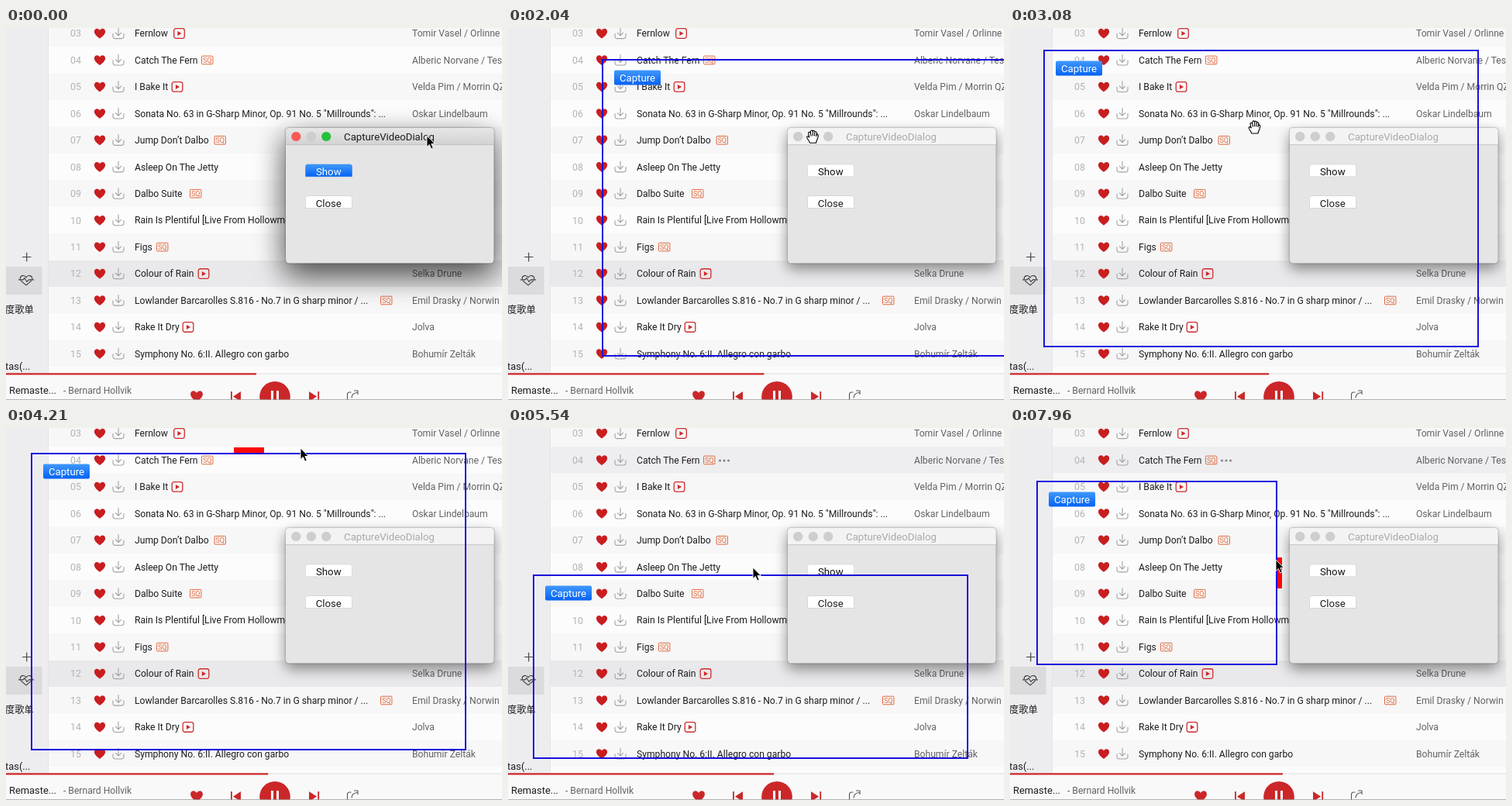
Recreate the animation shown at these times as an HTML page. Size 640 by 480 pixels, loop 8 s.

```html
<!DOCTYPE html>
<html lang="en">
<head>
<meta charset="utf-8">
<title>Capture dialog</title>
<style>
  html, body { margin: 0; width: 100%; height: 100%; overflow: hidden; background: #fcfcfd; }
  svg { display: block; width: 640px; height: 480px; }
  text { font-family: Roboto, Inter, sans-serif; font-size: 12.15px; fill: #1d1d1f; white-space: pre; }
  .num { fill: #b3b3b5; font-size: 12.4px; }
  .artist { fill: #626264; }
  .side { font-size: 12.9px; }
  .cjk { font-family: "Noto Sans CJK SC", "Noto Sans CJK", sans-serif; font-size: 12.3px; }
  .ui { font-size: 13.2px; text-anchor: middle; }
  .sq { font-size: 9px; fill: #e2683c; text-anchor: middle; }
  .line { fill: none; stroke-linecap: round; stroke-linejoin: round; }
  .light { stroke: #0001; stroke-width: .5; }
  #dialog { filter: drop-shadow(0 14px 19px #0008) drop-shadow(0 0 1px #0008); }
  #dialog.idle { filter: drop-shadow(0 7px 9px #0005) drop-shadow(0 0 1px #0006); }
  .idle .titlebar { fill: #f4f3f4; }
  .idle .title { fill: #a9a9a9; }
  .idle .light { fill: #cfcecf; }
  .idle .default { fill: #fff; stroke: #c6c6c6; }
  .idle .default + text { fill: #111; }
  .default + text { fill: #fff; }
</style>
</head>
<body>
<svg id="stage" viewBox="0 0 640 480">
  <defs>
    <linearGradient id="barGray" x2="0" y2="1"><stop stop-color="#e7e6e7"/><stop offset="1" stop-color="#d3d2d3"/></linearGradient>
    <linearGradient id="blue" x2="0" y2="1"><stop stop-color="#3f98fb"/><stop offset="1" stop-color="#0663f3"/></linearGradient>
    <path id="heart" d="M0 6.2C-3 4-7.1 1-7.1-2.6C-7.1-7.1-1.8-7.9 0-4.1C1.8-7.9 7.1-7.1 7.1-2.6C7.1 1 3 4 0 6.2Z"/>
    <g id="download" class="line" stroke="#a2a2a4" stroke-width="1.1">
      <path d="M0-7V2.5M-3.6-.8L0 2.8L3.6-.8M-7 .3V3.4Q-7 6.6-3.8 6.6H3.8Q7 6.6 7 3.4V.3"/>
    </g>
    <g id="video">
      <rect x=".7" y="-6.3" width="13.6" height="12.6" rx="2.6" fill="none" stroke="#cf2b2b" stroke-width="1.3"/>
      <path d="M5.4-3L10.6 0L5.4 3Z" fill="#cf2b2b"/>
    </g>
    <g id="sq">
      <rect x=".5" y="-5.3" width="14.4" height="10.6" rx="1" fill="none" stroke="#e2683c"/>
      <text class="sq" x="7.7" y="3.2">SQ</text>
    </g>
  </defs>

  <g id="list"></g>

  <rect width="54.5" height="446" fill="#ededf0"/>
  <path d="M54.5 0V446" stroke="#e3e3e6"/>
  <rect y="308" width="46.5" height="36" fill="#dbdbdd"/>
  <path class="line" d="M21.5 295.5H32M26.7 290.2V300.8" stroke="#444" stroke-width="1.2"/>
  <g class="line" transform="translate(26 325.5)" stroke="#38383a" stroke-width="1.1">
    <path d="M-6.5 .8L0 6.4L6.5 .8M-7.8-1.8C-7.8-6.6-2-7.2 0-3.6C2-7.2 7.8-6.6 7.8-1.8"/>
    <path d="M-9.5-.6H-4L-2-2.8L1 2L3.4-.6H9.5"/>
  </g>
  <text class="cjk" x="-1" y="368">度歌单</text>
  <text class="side" x="-1" y="440.5">tas(...</text>

  <rect y="445" width="640" height="35" fill="#f9f9fa"/>
  <rect y="445.5" width="640" height="1" fill="#e0e0e2"/>
  <rect id="progress" y="445.3" height="2.2" fill="#cd2426"/>
  <text class="side" x="4" y="471.7">Remaste...</text>
  <text class="artist" x="74" y="471.7">- Bernard Hollvik</text>
  <g fill="#cb2729">
    <use href="#heart" transform="translate(246 475.5) scale(1.12)"/>
    <path d="M290 469h1.8v13h-1.8zM303 469v13l-10-6.5zM391 469v13l10-6.5zM402.3 469h1.8v13h-1.8z"/>
    <circle cx="347" cy="475.8" r="19.8"/>
    <path d="M342 468h3v14h-3zM349 468h3v14h-3z" fill="#fff"/>
  </g>
  <path class="line" d="M445 470H443Q440.5 470 440.5 473V482M446 477Q446.5 471 453 470.5M449.5 468H454V472.5" stroke="#555" stroke-width="1.1"/>
  <path d="M0 479.6H640" stroke="#a3a3a5" stroke-width=".9"/>

  <g id="dialog">
    <rect x="361" y="129" width="268.5" height="174.5" rx="4.5" fill="#e6e5e6"/>
    <path class="titlebar" d="M361 151V133.5Q361 129 365.5 129H625Q629.5 129 629.5 133.5V151Z" fill="url(#barGray)"/>
    <path d="M361 150.6H629.5" stroke="#bcbbbc" stroke-width=".8"/>
    <circle class="light" cx="374.3" cy="140" r="6.1" fill="#f95954"/>
    <circle class="light" cx="393.8" cy="140" r="6.1" fill="#cfcecf"/>
    <circle class="light" cx="413.2" cy="140" r="6.1" fill="#22c23c"/>
    <text class="ui title" x="494.5" y="144.7" fill="#333">CaptureVideoDialog</text>
    <path class="default" d="M386.5 191.7V179Q386.5 176 389.5 176H443.5Q446.5 176 446.5 179V191.7Z" fill="url(#blue)" stroke="#2f7de0" stroke-width=".5"/>
    <text class="ui" x="416.3" y="190.2">Show</text>
    <path d="M386.5 232.5V219.5Q386.5 216.5 389.5 216.5H443.5Q446.5 216.5 446.5 219.5V232.5Z" fill="#fff" stroke="#c6c6c6" stroke-width=".6"/>
    <text class="ui" x="416.3" y="230.8">Close</text>
  </g>

  <g id="capture">
    <rect id="frame" fill="none" stroke="#1a10dc" stroke-width="2"/>
    <rect id="handle" fill="#fb0808"/>
    <g id="button">
      <rect width="60" height="19" rx="2" fill="url(#blue)"/>
      <text class="ui" x="30" y="14.4" style="fill:#fff">Capture</text>
    </g>
  </g>

  <path id="arrow" d="M0 0V14.5L3.3 11.4L5.7 17L8.2 15.9L5.8 10.5H10.3Z" fill="#000" stroke="#fff" stroke-width=".9"/>
  <path id="hand" d="M-3.5 8.5C-4.5 5.5-7.5 3-7.3 .8C-7-.6-5.2 0-4.2 1.4L-5.4-3.6C-5.6-5.6-3.4-6-2.8-4.2L-2.4-6.6C-2-8.2 .2-8 .2-6.2C.8-8 3-7.4 2.9-5.4C3.8-6.6 5.6-5.8 5.4-4L6.2-2C7.4-2.6 7.6-.6 7 1.2C6.4 4 4.8 5.6 4.6 8.5ZM-2.6-4L-1.8 0M.3-6V-.4M2.9-5L2.5-.2M5.3-3.4L4.7 .4" fill="#fff" stroke="#000" stroke-width="1.1" stroke-linejoin="round"/>
</svg>

<script>
const LOOP = 8000;
const $ = id => document.getElementById(id);

// title, badge, badge x, artist
const songs = [
  ["Fernlow", "video", 216, "Tomir Vasel / Orlinne Pask"],
  ["Catch The Fern", "sq", 252, "Alberic Norvane / Tessal"],
  ["I Bake It", "video", 213.5, "Velda Pim / Morrin QZA"],
  ["Sonata No. 63 in G-Sharp Minor, Op. 91 No. 5 \"Millrounds\": ...", "", 0, "Oskar Lindelbaum"],
  ["Jump Don’t Dalbo", "sq", 268.5, ""],
  ["Asleep On The Jetty", "", 0, ""],
  ["Dalbo Suite", "sq", 237, ""],
  ["Rain Is Plentiful [Live From Hollowmere]", "", 0, ""],
  ["Figs", "sq", 194, ""],
  ["Colour of Rain", "video", 247.5, "Selka Drune"],
  ["Lowlander Barcarolles S.816 - No.7 in G sharp minor / ...", "sq", 483, "Emil Drasky / Norwin Hale"],
  ["Rake It Dry", "video", 227.5, "Jolva"],
  ["Symphony No. 6:II. Allegro con garbo", "", 0, "Bohumír Zelták"],
  ["", "", 0, ""]
];
const ROW = 34.45, ODD = "#f7f7f8", EVEN = "#fcfcfd", HOVER = "#eeeef0", SELECTED = "#e9e8ea";

function songRow([title, badge, badgeX, artist], i) {
  const y = 7 + i * ROW;
  const fill = i === 9 ? SELECTED : i % 2 ? EVEN : ODD;
  const number = String(i + 3).padStart(2, "0");
  const band = `<rect id="row${i}" x="54" y="${y - ROW / 2}" width="586" height="${ROW}" fill="${fill}"/>`;
  if (!title) return band;
  return `${band}
    <text class="num" x="83" y="${y + 4.4}">${number}</text>
    <use href="#heart" x="121" y="${y + .3}" fill="#c81e20"/>
    <use href="#download" x="145" y="${y}"/>
    <text x="166" y="${y + 4.3}">${title}</text>
    ${badge && `<use href="#${badge}" x="${badgeX}" y="${y}"/>`}
    <text class="artist" x="524" y="${y + 4.3}">${artist}</text>`;
}
$("list").innerHTML = songs.map(songRow).join("") +
  `<g id="dots" fill="#858587">${[273.5, 279, 284.5].map(x => `<circle cx="${x}" cy="42" r="1.6"/>`).join("")}</g>`;

// pointer path: time, x, y
const path = [
  [0, 543, 139], [60, 543, 139], [900, 421, 184], [1800, 421, 184],
  [2200, 378, 116], [2460, 372, 127], [2800, 340, 118], [3250, 304, 132],
  [3350, 304, 132], [3850, 380, 26], [4300, 380, 26], [4600, 372, 12],
  [5040, 345, 36], [5450, 316, 183], [5520, 316, 180], [5570, 316, 180],
  [5850, 316, 250], [6300, 317, 102], [6550, 318, 129], [6900, 600, 176],
  [7200, 600, 176], [7400, 594, 172], [7960, 343, 170], [LOOP, 343, 170]
];
const clamp = (v, lo, hi) => Math.min(hi, Math.max(lo, v));
const between = (t, lo, hi) => t >= lo && t < hi;

function pointer(t) {
  const i = Math.max(1, path.findIndex(p => p[0] >= t));
  const [t0, x0, y0] = path[i - 1], [t1, x1, y1] = path[i];
  const u = clamp((t - t0) / (t1 - t0), 0, 1), e = u * u * (3 - 2 * u);
  return { x: x0 + (x1 - x0) * e, y: y0 + (y1 - y0) * e };
}

// The frame follows the pointer through four drags: move, top edge, move, right edge.
function frameAt(t) {
  const first = pointer(clamp(t, 1800, 3250));
  let left = first.x - 271, top = first.y - 99;
  let right = left + 560, bottom = top + 382;
  if (t > 4300) {
    top = pointer(Math.min(t, 5450)).y + 7;
    bottom += 11 * clamp((t - 4300) / 740, 0, 1);
  }
  if (t > 5850) {
    const from = pointer(5850), to = pointer(Math.min(t, 6550));
    const dx = to.x - from.x, dy = to.y - from.y;
    left += dx; right += dx; top += dy; bottom += dy;
  }
  if (t > 7400) right = pointer(t).x + 1;
  return { left, top, right, bottom };
}

function set(id, attrs) {
  for (const k in attrs) $(id).setAttribute(k, attrs[k]);
}
const show = (id, on) => set(id, { visibility: on ? "visible" : "hidden" });

function draw(t) {
  const p = pointer(t), f = frameAt(t);
  const open = t >= 1250, hover = t >= 4700;
  const left = Math.round(f.left), top = Math.round(f.top);
  const width = Math.round(f.right) - left, height = Math.round(f.bottom) - top;

  $("dialog").classList.toggle("idle", open);
  $("capture").style.display = open ? "" : "none";
  set("frame", { x: left, y: top, width, height });
  set("button", { transform: `translate(${left + 15} ${top + 13.5})` });

  const onTop = between(t, 3800, 5480), onRight = t >= 6880;
  show("handle", onTop || onRight);
  set("handle", onRight
    ? { x: left + width + 1, y: top + height / 2 - 20, width: 6, height: 40 }
    : { x: left + width / 2 - 19, y: top - 8, width: 39, height: 7 });

  const grabbing = between(t, 1300, 3300) || between(t, 5700, 6600);
  show("hand", grabbing);
  show("arrow", !grabbing);
  set(grabbing ? "hand" : "arrow", { transform: `translate(${p.x} ${p.y})` });

  show("dots", hover);
  set("row1", { fill: hover ? HOVER : EVEN });
  set("progress", { width: 323 + 29 * t / LOOP });
}

const start = performance.now();
function tick() {
  draw((performance.now() - start) % LOOP);
  requestAnimationFrame(tick);
}
tick();
</script>
</body>
</html>
```
